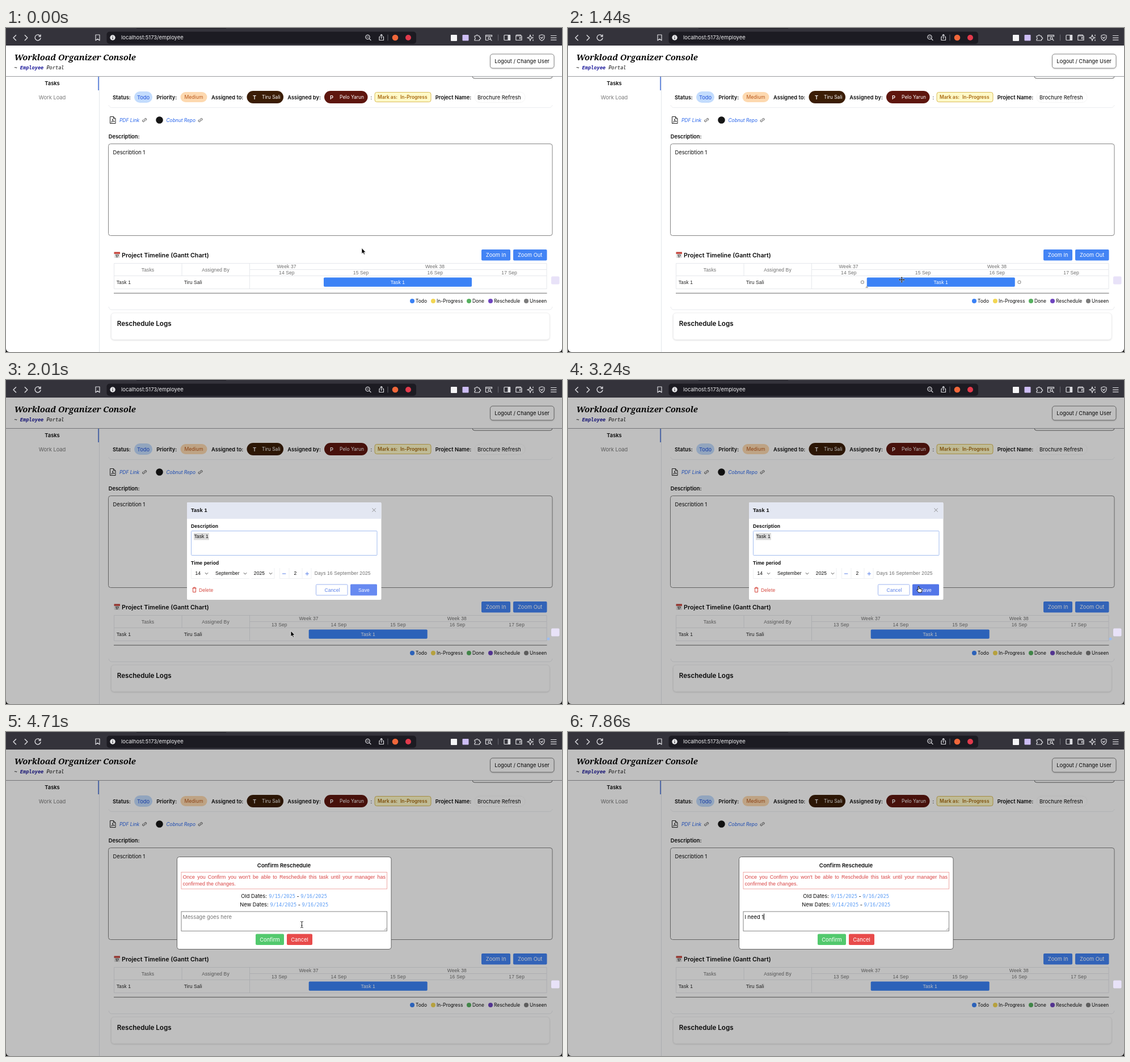
Recreate the animation shown at these times as an HTML page. Size 980 px wide and 572 px high, loop 8 s.

```html
<!DOCTYPE html>
<html lang="en">
<head>
<meta charset="utf-8">
<title>Task reschedule</title>
<style>
html, body { margin: 0; width: 100%; height: 100%; overflow: hidden; background: #fff; }
svg { display: block; width: 980px; height: 572px; }
text { font: 9.3px Inter, sans-serif; fill: #0a0a0a; white-space: pre; }
.b { font-weight: 600; }
.mid { text-anchor: middle; }
.s { font-size: 8.4px; }
.a text, .warn { font: 8.5px "Liberation Sans", Arial, sans-serif; letter-spacing: .12px; }
.a .b { font-weight: 700; }
.grid text { fill: #6f6f6f; }
.mono { font: 8.6px "DejaVu Sans Mono", monospace; }
.date { fill: #5b9cf5; }
.title { font: italic 700 14.8px "Noto Serif", serif; letter-spacing: -.2px; }
.link { font-size: 8.4px; font-style: italic; fill: #2563eb; }
.w, .a .w { fill: #fff; }
.warn { font-size: 9px; letter-spacing: 0; line-height: 12px; text-align: justify; color: #d94444; }
.ln { fill: none; stroke: #e4e6ea; }
.ic { fill: none; stroke: #dcdce0; stroke-width: 1.2; stroke-linecap: round; stroke-linejoin: round; }
</style>
</head>
<body>
<svg viewBox="0 0 980 572">
  <defs>
    <filter id="soft" x="-10%" y="-30%" width="120%" height="170%">
      <feDropShadow dx="0" dy="1" stdDeviation="1" flood-opacity=".16"/>
    </filter>
    <g id="chain" fill="none" stroke="#333" stroke-width=".9" stroke-linecap="round">
      <path d="M-.8 1.2L1.2 -.8M-.3 -1.4L.8 -2.5A1.7 1.7 0 0 1 3.2 -.1L2 1M.5 1.6L-.6 2.7A1.7 1.7 0 0 1 -3 .3L-1.9 -.8"/>
    </g>
    <path id="down" d="M-2.6 -1.2L0 1.4L2.6 -1.2" fill="none" stroke="#444"/>
  </defs>

  <!-- page -->
  <rect width="980" height="572" fill="#fff"/>
  <rect x="822" y="66" width="141" height="23" rx="4" fill="#fff" stroke="#666"/>
  <path class="ln" d="M164.5 86V572"/>
  <path d="M163 86V110" stroke="#2f5fd0" stroke-width="1.4"/>
  <text class="b mid" x="81.5" y="101.3">Tasks</text>
  <text class="mid" x="81.5" y="125.7" fill="#777" style="fill:#777">Work Load</text>

  <rect y="31" width="980" height="54.5" fill="#fff"/>
  <path d="M0 85.5H980" stroke="#8f9196" stroke-width=".9"/>
  <text class="title" x="14.500" y="57">Workload Organizer Console</text>
  <text class="mono" x="14.500" y="73.300" style="font-style:italic">~ <tspan font-weight="700" fill="#1e1b9b">Employee</tspan> Portal</text>
  <rect x="853.500" y="46" width="112.500" height="25" rx="4.500" fill="#fff" stroke="#666" stroke-width=".8" filter="url(#soft)"/>
  <text class="mid" x="909.500" y="62">Logout / Change User</text>

  <path class="ln" d="M181 136Q182 140.500 187 140.500H957Q962 140.500 963 136" stroke-opacity=".7"/>
  <text class="b" x="188" y="125.700">Status:</text>
  <rect x="226" y="112" width="32" height="20" rx="10" fill="#c3dcfd"/>
  <text class="mid" x="242" y="125.700" style="fill:#1d4ed8">Todo</text>
  <text class="b" x="265.300" y="125.700">Priority:</text>
  <rect x="307.500" y="113" width="47" height="18" rx="9" fill="#fdd9b0"/>
  <text class="mid" x="331" y="125.300" style="fill:#b9571c;font-size:8.700px">Medium</text>
  <text class="b" x="362" y="125.700">Assigned to:</text>
  <rect x="424.500" y="111" width="64.500" height="22" rx="11" fill="#3b1d06"/>
  <text class="b mid w" x="438" y="125.700">T</text>
  <text class="w" x="451" y="125.400" style="font-size:8.500px">Tiru Sali</text>
  <text class="b" x="496.300" y="125.700">Assigned by:</text>
  <rect x="561" y="111" width="76.500" height="22" rx="11" fill="#5e160e"/>
  <text class="b mid w" x="574" y="125.700">P</text>
  <text class="w" x="588" y="125.400" style="font-size:8.500px">Pelo Yarun</text>
  <text x="642.500" y="125.700">:</text>
  <rect x="650" y="113.500" width="99" height="17" rx="3.500" fill="#fef9c8" stroke="#d6b54a" stroke-width=".9"/>
  <text class="b s" x="655" y="125.200" style="fill:#a8690f">Mark as:</text>
  <text class="b s" x="695" y="125.200" style="fill:#a8690f">In-Progress</text>
  <text class="b" x="756.800" y="125.700">Project Name:</text>
  <rect x="826" y="113" width="89" height="18.500" rx="9" fill="#fff" stroke="#f1f1f1" stroke-width=".8"/>
  <text x="831" y="125.700">Brochure Refresh</text>

  <g fill="none" stroke="#222">
    <path d="M183.500 156.500H189.500L193 160V168.500H183.500ZM189.500 156.500V160H193"/>
    <path d="M185.500 166.500Q188.500 163 187.800 160.500Q188 164.500 191.500 165Q188 164.500 185.500 166.500" stroke-width=".8"/>
  </g>
  <text class="link" x="200" y="165.500">PDF Link</text>
  <use href="#chain" x="244" y="162.500"/>
  <circle cx="270.500" cy="162.500" r="6.300" fill="#161616"/>
  <text class="link" x="282.500" y="165.500">Cobnut Repo</text>
  <use href="#chain" x="342.500" y="162.500"/>

  <text class="b" x="180.700" y="195.400">Description:</text>
  <rect x="180.500" y="204.500" width="782.500" height="162" rx="4" fill="#fff" stroke="#777" stroke-width=".9"/>
  <text x="188.500" y="222.600">Describtion 1</text>

  <!-- gantt -->
  <path class="ln" d="M181 492Q182 497.500 187 497.500H957Q962 497.500 963 492" stroke-opacity=".8"/>
  <rect x="190.500" y="395" width="10.500" height="11" rx="1.200" fill="#e3e3e3"/>
  <path d="M190.500 395.500H201V398.800H190.500Z" fill="#c8433a"/>
  <text class="b mid" x="195.700" y="404.800" style="font-size:6px">17</text>
  <text class="b" x="204" y="404.500" style="font-size:10.700px">Project Timeline (Gantt Chart)</text>
  <rect x="838" y="391" width="51" height="19.500" rx="2" fill="#4384f5"/>
  <rect x="894" y="391" width="59.500" height="19.500" rx="2" fill="#4384f5"/>
  <text class="mid w" x="863.700" y="404.300">Zoom In</text>
  <text class="mid w" x="923.700" y="404.300">Zoom Out</text>

  <g class="a grid">
    <path class="ln" d="M190.500 415.500H953V460.500H190.500ZM190.500 437.500H953M429.500 415.500V460.500M310 416V437M430 426.500H953" stroke-width=".9"/>
    <text class="mid" x="250" y="429.600">Tasks</text>
    <text class="mid" x="369.500" y="429.600">Assigned By</text>
    <text x="194.700" y="451.800" style="fill:#222">Task 1</text>
    <text x="313.800" y="451.800" style="fill:#222">Tiru Sali</text>
    <g id="scale"></g>
    <g id="bar">
      <rect id="barBox" y="440.500" height="16.300" rx="1.800" fill="#3b82f6"/>
      <text id="barText" class="mid w" y="451.700" style="fill:#fff">Task 1</text>
      <g id="handles" fill="#fff" stroke="#a2a2a2" stroke-width="1.300">
        <circle cx="-7.800" cy="448.700" r="2.500"/><circle cx="268.700" cy="448.700" r="2.500"/>
        <path d="M-2 458.500L0 455.500L2 458.500Z" fill="#bbb" stroke-width=".7"/>
      </g>
    </g>
  </g>
  <path d="M190 468.300H953.500" stroke="#9b9b9b" stroke-width="1.400"/>
  <g id="legend"></g>

  <rect x="185.500" y="503" width="772.500" height="47" rx="5" fill="#fff" stroke="#ececee" stroke-width=".8" filter="url(#soft)"/>
  <text class="b" x="195.800" y="525.700" style="font-size:11.600px">Reschedule Logs</text>

  <rect id="dim" y="31" width="980" height="541" fill-opacity=".25"/>
  <rect x="961" y="438.500" width="14.500" height="14" rx="2" fill="#e8e2f8"/>

  <!-- task editor -->
  <g id="editor" class="a">
    <circle cx="956" cy="457" r="2.500" fill="#9dbdf0"/>
    <rect x="319" y="216" width="342.500" height="172" rx="2" fill="#fff"/>
    <path d="M319 245V218Q319 216 321 216H659.500Q661.500 216 661.500 218V245Z" fill="#e3e7f2"/>
    <text class="b" x="326" y="232.800" style="font-size:9.200px">Task 1</text>
    <path d="M645.500 226.500L651.700 232.700M651.700 226.500L645.500 232.700" stroke="#888"/>
    <text class="b" x="326" y="261">Description</text>
    <rect x="326.500" y="266.500" width="327.500" height="43" rx="1" fill="#fff" stroke="#a3bdef"/>
    <rect x="331" y="270" width="27" height="12.500" fill="#dcdcdc"/>
    <text x="331.500" y="279.400">Task 1</text>
    <text class="b" x="326" y="325.800">Time period</text>
    <path class="ln" d="M326.500 332V350.500H360M364.500 350.500H429M432.500 350.500H473V332M482.500 332V350.500H538V332M499 332V350.500M522 332V350.500" stroke-width=".7" stroke-opacity=".8"/>
    <text x="333.500" y="344.300">14</text><use href="#down" x="353.500" y="341.500"/>
    <text x="369" y="344.300">September</text><use href="#down" x="421.500" y="341.500"/>
    <text x="436.800" y="344.300">2025</text><use href="#down" x="466.500" y="341.500"/>
    <path d="M487 342H493.300M527.500 342H534M530.750 338.800V345.200" stroke="#5a80e8"/>
    <text class="mid" x="510" y="344.300">2</text>
    <text x="543.700" y="344.300" style="fill:#6f6f6f">Days 16 September 2025</text>
    <path d="M328.500 367.500H335.500M330.500 367V366H333.500V367M329.500 368V374.500H334.500V368" fill="none" stroke="#d5483f"/>
    <text x="340" y="373.500" style="fill:#d5483f">Delete</text>
    <rect x="546.500" y="361" width="55.500" height="19" rx="1.500" fill="#fff" stroke="#9db4f0"/>
    <text class="mid" x="575" y="373.700" style="fill:#5a80e8">Cancel</text>
    <rect id="save" x="607" y="360.500" width="47" height="20" rx="1.500"/>
    <text class="mid w" x="631" y="373.700">Save</text>
  </g>

  <!-- confirmation -->
  <g id="confirm">
    <rect x="301.500" y="220.500" width="377.500" height="163" rx="4" fill="#fff" stroke="#444" stroke-width=".8"/>
    <text class="b mid" x="490" y="238.500" style="font-size:9.600px">Confirm Reschedule</text>
    <rect x="309" y="247.500" width="362.500" height="29.500" fill="#fff" stroke="#eda19d" stroke-width=".9"/>
    <foreignObject x="311.500" y="250" width="357.500" height="26">
      <div class="warn">Once you Confirm you won't be able to Reschedule this task until your manager has confirmed the changes.</div>
    </foreignObject>
    <text x="414.300" y="293">Old Dates:</text>
    <text class="mono date" x="463.300" y="293">9/15/2025</text>
    <text x="512.500" y="293">-</text>
    <text class="mono date" x="519.300" y="293">9/16/2025</text>
    <text x="412.300" y="308">New Dates:</text>
    <text class="mono date" x="465.500" y="308">9/14/2025</text>
    <text x="514.700" y="308">-</text>
    <text class="mono date" x="521.500" y="308">9/16/2025</text>
    <rect x="309" y="317" width="362.500" height="34.300" fill="#fff" stroke="#777" stroke-width=".9"/>
    <path d="M666.500 350L670.500 346M669 350L670.500 348.500" stroke="#777" stroke-width=".7"/>
    <text id="msg" x="311.500" y="330"></text>
    <path id="caret" d="M0 320.500V332" stroke="#000" stroke-width=".9"/>
    <rect x="440" y="356.500" width="50" height="19.500" rx="2" fill="#52c96d"/>
    <rect x="495" y="356.500" width="45" height="19.500" rx="2" fill="#e84b4b"/>
    <text class="mid w" x="465" y="369.700">Confirm</text>
    <text class="mid w" x="517.500" y="369.700">Cancel</text>
  </g>

  <!-- browser bar -->
  <rect width="980" height="31" fill="#34333b"/>
  <rect x="230" width="158" height="1" fill="#1d1c23"/>
  <rect x="177.500" y="6.500" width="545.500" height="21.500" rx="5" fill="#1c1b22"/>
  <g class="ic">
    <path d="M17.500 12.800L13 17.300L17.500 21.800M33.300 12.800L37.800 17.300L33.300 21.800" stroke-width="1.500"/>
    <path d="M60.500 14.500A5 5 0 1 0 61 18M61 12V15H58" stroke-width="1.400"/>
    <path d="M158 12H165V22L161.500 19.300L158 22Z"/>
    <circle cx="637.500" cy="16" r="3.700"/><path d="M640.300 18.800L643 21.500M636 16H639"/>
    <path d="M659.500 15.500H658V21.500H665.500V15.500H664M661.700 18.500V11.500M659.700 13.300L661.700 11.300L663.700 13.300"/>
    <path d="M673 12V22M867.500 12V22" stroke="#77767e" stroke-width=".8"/>
    <path d="M826 14H828.500A1.700 1.700 0 1 1 832 14H834.500V16.500A1.700 1.700 0 1 1 834.500 19.800V22H826V19.800A1.700 1.700 0 0 0 826 16.500Z"/>
    <path d="M856.500 15V12.500H845.500V21.500H850M845.500 14.500H856.500"/><circle cx="852" cy="18" r="2"/><path d="M853.500 19.500L856 22"/>
    <rect x="878" y="12.500" width="10.500" height="9" rx="1"/><path d="M885 12.500H888.500V21.500H885Z" fill="#dcdce0"/>
    <path d="M907.500 14V12.300H900Q898.800 12.300 898.800 14V21.500H909V14H899M909 16.500H905.500V19H909"/>
    <path d="M923 12L924.300 16L928.300 17.300L924.300 18.600L923 22.600L921.700 18.600L917.700 17.300L921.700 16Z M928 12V14M928 20.500V22.500" transform="translate(1)"/>
    <path d="M944.500 11.800L949 13.200V17Q948.500 20.500 944.500 22.500Q940.500 20.500 940 17V13.200ZM942.500 16.500L944.500 18.500L946.500 15.500"/>
    <path d="M960.500 13.500H970M960.500 17.300H970M960.500 21.100H970"/>
  </g>
  <circle cx="188" cy="17" r="4.700" fill="#e6e6e8"/>
  <path d="M188 16.500V19.500M188 14.300V15.300" stroke="#1c1b22" stroke-width="1.200"/>
  <text x="203" y="20.400" style="fill:#f0f0f2;font-size:9.400px">localhost:5173/employee</text>
  <circle cx="686" cy="17" r="5.300" fill="#f0673a"/>
  <circle cx="709" cy="17" r="5" fill="#e23a4c"/>
  <rect x="784" y="12" width="11" height="11" rx="1" fill="#f4f4f6"/>
  <rect x="804.500" y="12" width="11" height="10.500" rx="1" fill="#cdbdf4"/>
  <path d="M0 566Q.5 571.500 6 572H0ZM980 566Q979.500 571.500 974 572H980Z" fill="#111"/>

  <!-- pointers, each with its hot spot at 0,0 -->
  <g id="pointers">
    <path id="arrow" d="M0 0V10.200L2.300 8L4 11.600L5.600 10.900L4 7.400H7.100Z" fill="#000" stroke="#fff" stroke-width=".7"/>
    <path id="hand" d="M-1 .8Q0 -.6 1 .8V4.300L5 5.200Q6.300 5.600 6 7.300L5.200 11H-.2L-3 7.200Q-3.300 5.800 -1.800 6.300L-1 7Z" fill="#fff" stroke="#000" stroke-width=".9"/>
    <g id="move" stroke="#fff" stroke-width=".5">
      <path d="M0 -5.500L2 -3H.7V-.7H3V-2L5.500 0L3 2V.7H.7V3H2L0 5.500L-2 3H-.7V.7H-3V2L-5.500 0L-3 -2V-.7H-.7V-3H-2Z"/>
    </g>
    <path id="beam" d="M-2.300 -5.500Q0 -5.500 0 -4Q0 -5.500 2.300 -5.500M0 -4V4M-2.300 5.500Q0 5.500 0 4Q0 5.500 2.300 5.500M-1.200 1.500H1.200" fill="none" stroke="#111" stroke-width=".9"/>
  </g>
</svg>
<script>
const $ = id => document.getElementById(id);
const show = (id, on) => { $(id).style.display = on ? '' : 'none'; };
const label = (x, y, s, cls) => `<text class="${cls}" x="${x}" y="${y}">${s}</text>`;

const DRAG = 1170, DROP = 2010, SAVED = 3870, FOCUS = 5190, HIDE = 5940;

// time, x, y of the pointer
const path = [
  [0, 627, 388.5], [810, 621.5, 445], [DRAG, 621.5, 445], [1950, 502, 443],
  [2100, 502, 443], [3150, 618, 364], [4350, 618, 364], [4700, 521.5, 340],
  [4860, 516, 338], [5070, 516, 338], [5340, 505, 352], [8000, 505, 352]
];
const message = 'I need 1';
const keyTimes = [5700, 6180, 6630, 6840, 7020, 7110, 7230, 7680];

$('legend').innerHTML = [
  [716, '#3b82f6', 'Todo'], [753, '#f3d654', 'In-Progress'], [816, '#57b160', 'Done'],
  [854, '#6f45c0', 'Reschedule'], [917, '#7c7c7c', 'Unseen']
].map(([x, c, s]) => `<circle cx="${x}" cy="482" r="4" fill="${c}"/>` + label(x + 6, 485.2, s, 's')).join('');

// Day columns share the width from 429.5 to 953; week 38 starts on the 15th.
function scale(first, weeks) {
  const w = 523 / (18 - first);
  let out = weeks.map(([x, n]) => label(x, 424, 'Week ' + n, 'mid')).join('');
  for (let d = first; d < 18; d++) out += label(429.5 + w * (d - first + .5), 435.2, d + ' Sep', 'mid');
  return out;
}
const scales = [scale(14, [[494.5, 37], [756, 38]]), scale(13, [[533.5, 37], [794.8, 38]])];

function pointer(t) {
  const i = path.findIndex(p => p[0] > t);
  const [t0, x0, y0] = path[i - 1], [t1, x1, y1] = path[i];
  const k = (t - t0) / (t1 - t0), e = k * k * (3 - 2 * k);
  return [x0 + (x1 - x0) * e, y0 + (y1 - y0) * e];
}

function kindOf(t, x, y, onSave) {
  if (t < DRAG) return y > 440 ? 'hand' : 'arrow';
  if (t < DROP) return 'move';
  if (t < SAVED) return onSave ? 'hand' : 'arrow';
  return y < 351 ? 'beam' : 'arrow';
}

let shownScale = -1;
function draw(now) {
  const t = now % 8000, dropped = t >= DROP;
  const [x, y] = pointer(t);
  const onSave = x > 607 && x < 654 && y > 360 && y < 381;
  const kind = kindOf(t, x, y, onSave);

  if (shownScale !== +dropped) $('scale').innerHTML = scales[shownScale = +dropped];
  const width = dropped ? 209 : 261;
  const left = dropped ? 533.7 : t < DRAG ? 560 : x - 61.5;
  $('bar').setAttribute('transform', `translate(${left})`);
  $('barBox').setAttribute('width', width);
  $('barText').setAttribute('x', width / 2);
  show('handles', kind === 'hand' && t < DRAG || kind === 'move');

  show('dim', dropped);
  show('editor', dropped && t < SAVED);
  show('confirm', t >= SAVED);
  $('save').setAttribute('fill', onSave ? '#5376e8' : '#678af1');

  const typed = message.slice(0, keyTimes.filter(k => t >= k).length);
  $('msg').textContent = typed || 'Message goes here';
  $('msg').style.fill = typed ? '#000' : '#777';
  show('caret', t >= FOCUS);
  if (t >= FOCUS) {
    const end = typed ? $('msg').getComputedTextLength() : 0;
    $('caret').setAttribute('transform', `translate(${312 + end})`);
  }

  for (const id of ['arrow', 'hand', 'move', 'beam']) show(id, id === kind && t < HIDE);
  $('pointers').setAttribute('transform', `translate(${x} ${y})`);
  requestAnimationFrame(draw);
}
requestAnimationFrame(draw);
</script>
</body>
</html>
```
